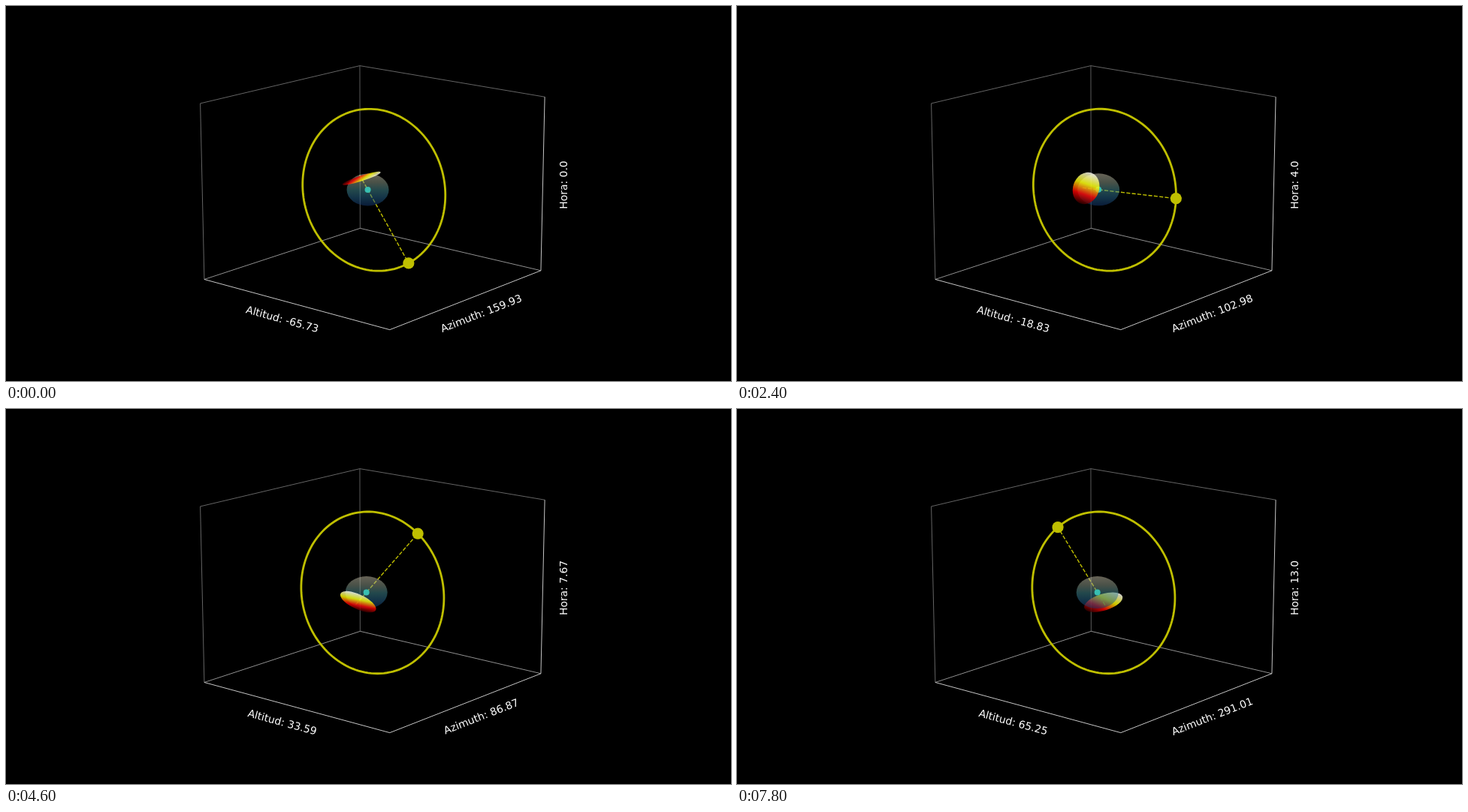
Recreate the animation shown at these times as an HTML page. Size 965 by 500 pixels, loop 8 s.

```html
<!DOCTYPE html>
<html lang="es">
<head>
<meta charset="utf-8">
<title>Altitud y azimuth</title>
<style>
  html, body { margin: 0; width: 100%; height: 100%; overflow: hidden; background: #000; }
  svg { display: block; }
  text { font: 13.89px "DejaVu Sans", sans-serif; fill: #fff; text-anchor: middle; }
</style>
</head>
<body>
<svg width="965" height="500" viewBox="0 0 965 500">
  <defs>
    <linearGradient id="earth" x1="0" y1="0" x2="0" y2="1">
      <stop offset="0" stop-color="#c6bea6"/>
      <stop offset=".28" stop-color="#8c9c8a"/>
      <stop offset=".52" stop-color="#428a92"/>
      <stop offset=".76" stop-color="#24628a"/>
      <stop offset="1" stop-color="#12346a"/>
    </linearGradient>
    <linearGradient id="hot" x1="0" y1="0" x2="0" y2="1">
      <stop offset="0" stop-color="#300000"/>
      <stop offset=".3" stop-color="#f00"/>
      <stop offset=".63" stop-color="#ff0"/>
      <stop offset="1" stop-color="#fff"/>
    </linearGradient>
  </defs>
  <rect width="965" height="500"/>
  <g id="box" fill="none"></g>
  <path id="ring" fill="none" stroke="#bfbf00" stroke-width="2.8"/>
  <g id="scene">
    <path id="ray" fill="none" stroke="#bfbf00" stroke-width="1.39" stroke-dasharray="5.14 2.22"/>
    <ellipse id="globe" rx="28" ry="21.5" fill="url(#earth)" opacity=".52"/>
    <circle id="core" r="4" fill="#38bfb2"/>
    <circle id="disc" r="1" fill="url(#hot)" opacity=".8"/>
  </g>
  <circle id="sun" r="7.6" fill="#bfbf00"/>
  <text id="alt" transform="translate(367.8 417.3) rotate(15.3)" dy=".365em"></text>
  <text id="azi" transform="translate(632.3 409.6) rotate(-21.4)" dy=".365em"></text>
  <text id="hour" transform="translate(741.8 238.5) rotate(-90)" dy=".365em"></text>
</svg>
<script>
const RAD = Math.PI / 180;
const STEP = 200, STEPS = 40;
const LAT = -16.419 * RAD, DECL = -6.47 * RAD, START = 8.1613;
const SCALE = { x: 0.523, y: 0.521, z: 0.392 };
const DISC_R = 0.196, DISC_DIST = 0.155, RAY_BACK = 0.2;
const { sin, cos } = Math;
const el = id => document.getElementById(id);

// Perspective camera: elevation 15°, azimuth -50°, distance 10
function view(x, y, z) {
  const se = sin(15 * RAD), ce = cos(15 * RAD), sa = sin(50 * RAD), ca = cos(50 * RAD);
  const w = ca * x - sa * y;
  const f = 2702 / (10 - ce * w - se * z);
  return [489.5 + f * (sa * x + ca * y), 243.4 - f * (ce * z - se * w)];
}

// East, north, up to pixels
function project([e, n, u], shift) {
  return view(shift - SCALE.x * n, SCALE.y * e, SCALE.z * u - 0.0126);
}

// Direction of the sun at an hour of the day
function sunAt(hour) {
  const h = (15 * hour + START) * RAD;
  return [
    cos(DECL) * sin(h),
    sin(DECL) * cos(LAT) + cos(DECL) * sin(LAT) * cos(h),
    sin(LAT) * sin(DECL) - cos(LAT) * cos(DECL) * cos(h)
  ];
}

const times = (v, k) => v.map(c => c * k);
const plus = (a, b) => a.map((c, i) => c + b[i]);
const path = pts => "M" + pts.map(p => p.map(c => c.toFixed(2)).join(" ")).join("L");

function label(v) {
  const r = Math.round(v * 100) / 100;
  return Number.isInteger(r) ? r.toFixed(1) : String(r);
}

function place(node, [x, y]) {
  node.setAttribute("cx", x);
  node.setAttribute("cy", y);
}

function drawBox() {
  const a = 0.595238, b = 0.446429;
  const line = (pts, color) =>
    `<path d="${path(pts.map(p => view(p[0] * a, p[1] * a, p[2] * b)))}" stroke="${color}" stroke-width=".9"/>`;
  el("box").innerHTML =
    line([[-1, -1, -1], [-1, -1, 1], [-1, 1, 1], [1, 1, 1]], "#707070") +
    line([[-1, 1, 1], [-1, 1, -1]], "#666") +
    line([[-1, -1, -1], [-1, 1, -1], [1, 1, -1]], "#a0a0a0") +
    line([[-1, -1, -1], [1, -1, -1], [1, 1, -1], [1, 1, 1]], "#dcdcdc");
}

function draw(step) {
  const hour = step / 3;
  const s = sunAt(hour);
  const alt = Math.asin(s[2]);
  const azi = Math.atan2(s[0], s[1]);
  const q = Math.min(1, Math.max(0, (step - 8) / 14));
  const shift = -0.0385 - 0.009 * q * q * (3 - 2 * q);
  const at = v => project(v, shift);

  const ring = [];
  for (let i = 0; i <= 144; i++) ring.push(at(sunAt(i / 6)));
  el("ring").setAttribute("d", path(ring));

  const sun = at(s), centre = at([0, 0, 0]);
  el("ray").setAttribute("d", path([at(times(s, -RAY_BACK)), sun]));
  place(el("sun"), sun);
  place(el("globe"), centre);
  place(el("core"), centre);

  // The disc faces the sun; its local y axis points uphill
  const mid = times(s, -DISC_DIST);
  const side = [-cos(azi), sin(azi), 0];
  const up = [-sin(alt) * sin(azi), -sin(alt) * cos(azi), cos(alt)];
  const c = at(mid);
  const p = at(plus(mid, times(side, DISC_R)));
  const r = at(plus(mid, times(up, DISC_R)));
  el("disc").setAttribute("transform",
    `matrix(${[p[0] - c[0], p[1] - c[1], r[0] - c[0], r[1] - c[1], ...c].join(" ")})`);

  const depth = -0.3855 * s[0] - 0.3353 * s[1] + 0.1014 * s[2];
  if (depth > 0) el("scene").prepend(el("disc"));
  else el("scene").append(el("disc"));

  el("alt").textContent = "Altitud: " + label(alt / RAD);
  el("azi").textContent = "Azimuth: " + label((azi / RAD + 360) % 360);
  el("hour").textContent = "Hora: " + label(hour);
}

let shown = -1;
function tick() {
  const step = Math.floor(performance.now() / STEP) % STEPS;
  if (step !== shown) draw(shown = step);
  requestAnimationFrame(tick);
}

drawBox();
tick();
</script>
</body>
</html>
```
